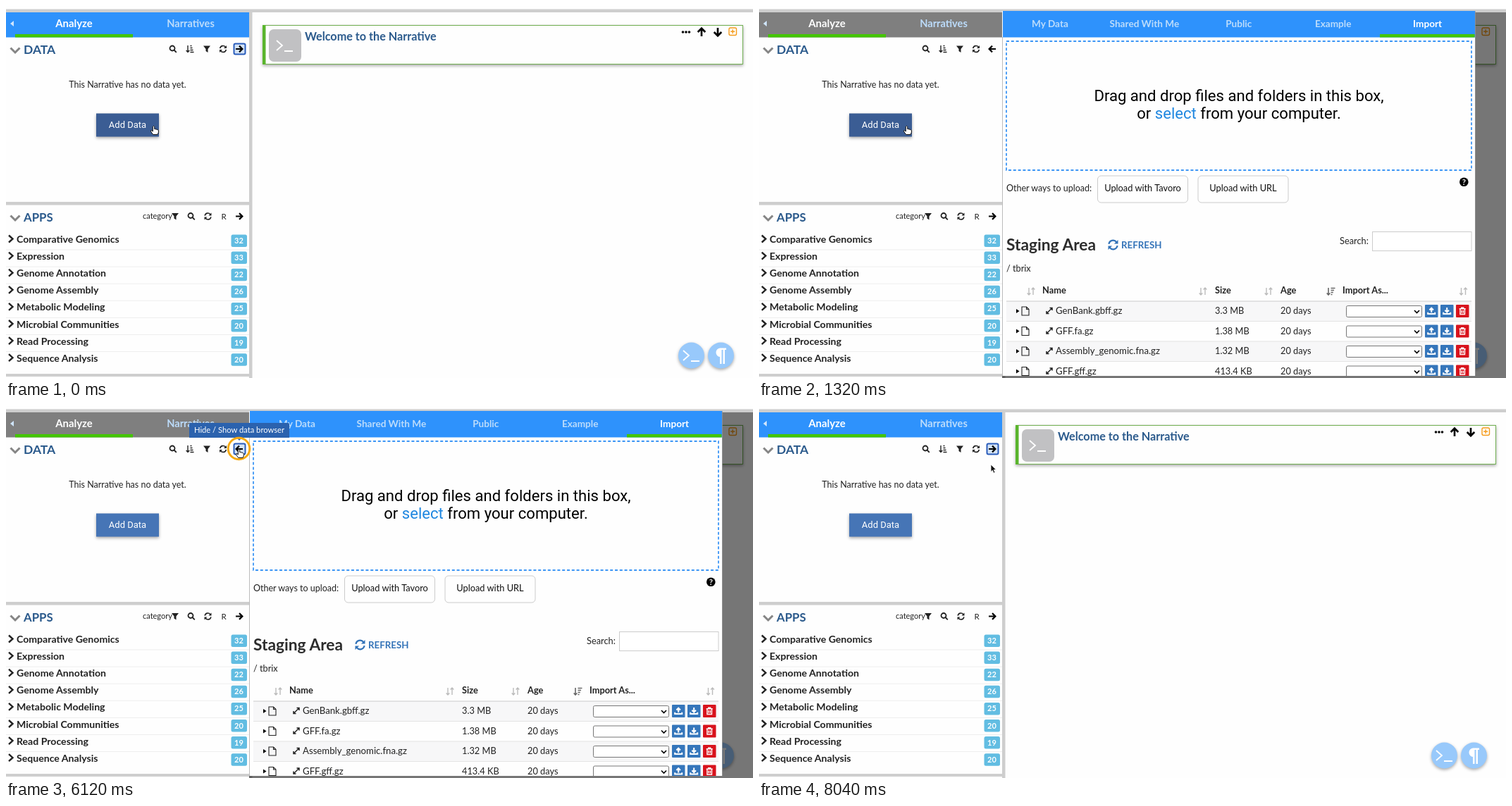
An HTML page for the animation above (8.48 s loop, 1060x528 px).

```html
<!DOCTYPE html>
<html lang="en">
<head>
<meta charset="utf-8">
<title>Adding data to a narrative</title>
<style>
html, body { margin: 0; width: 100%; height: 100%; overflow: hidden; background: #fefefe; }
svg { display: block; width: 1060px; height: 528px; font-family: Lato, "Open Sans", sans-serif; }
.b { font-weight: 700; }
.m { text-anchor: middle; }
.r { font-family: Roboto, Arial, sans-serif; }
.line { fill: none; stroke: currentColor; }
.shade { filter: drop-shadow(0 2px 2px #0005); }
</style>
</head>
<body>
<svg id="stage" viewBox="0 0 1060 528" xmlns="http://www.w3.org/2000/svg">
<defs>
  <clipPath id="side"><rect x="345" y="7" width="715" height="518"/></clipPath>
  <g id="search" class="line" stroke-width="1.8"><circle cx="-1" cy="-1" r="3.5"/><path d="M1.5 1.5L4.8 4.8"/></g>
  <path id="filter" d="M-5-4.5H5L1.5 0V5L-1.5 3V0Z" fill="currentColor"/>
  <g id="refresh"><path class="line" stroke-width="1.6" d="M-4.3-.8A4.3 4.3 0 0 1 3.4-2.8M4.3.8A4.3 4.3 0 0 1-3.4 2.8"/>
    <path fill="currentColor" d="M5-5V-1H1ZM-5 5V1H-1Z"/></g>
  <path id="arrow" class="line" stroke-width="2.2" d="M-5 0H4M0-4.4L4.4 0L0 4.4"/>
  <path id="ascend" class="line" stroke-width="1.4" d="M-3-5V4.5M-5.3 2L-3 4.5L-.7 2M.5-4.5H2.5M.5-1.5H3.5M.5 1.5H4.5M.5 4.5H5.5"/>
  <path id="descend" class="line" stroke-width="1.6" d="M-3-5V5M-5.3 2.5L-3 5L-.7 2.5M.5-4.5H6.5M.5-1.5H5M.5 1.5H3.8M.5 4.5H2.5"/>
  <path id="updown" class="line" stroke-width="1.4" d="M-3-5V5M-5.3 2.5L-3 5L-.7 2.5M3 5V-5M.7-2.5L3-5L5.3-2.5"/>
  <path id="down" class="line" stroke-width="3" d="M-6.5-3.5L0 3L6.5-3.5"/>
  <path id="next" class="line" stroke-width="2.4" d="M-3-5L2.5 0L-3 5"/>
  <path id="file" class="line" stroke-width="1.1" d="M-5-6H1.5L5-2.5V6H-5ZM1.5-6V-2.5H5"/>
  <path id="expand" class="line" stroke-width="1.5" d="M-4 4L4-4M.5-4H4V-.5M-4 .5V4H-.5"/>
  <path id="upload" class="line" stroke-width="2" d="M0 2V-4M-2.8-1.5L0-4.3L2.8-1.5M-5 1.8V4H5V1.8"/>
  <path id="download" class="line" stroke-width="2" d="M0-5V1M-2.8-1.2L0 1.5L2.8-1.2M-5 1.8V4H5V1.8"/>
  <path id="trash" class="line" stroke-width="1.4" d="M-4.5-3.2H4.5M-1.5-3.2V-4.8H1.5V-3.2M-3.3-3V4.5H3.3V-3M-1.2-1V2.8M1.2-1V2.8"/>
  <path id="prompt" class="line" stroke-width="1.8" d="M-11-7L-3 0L-11 7M0 8H12"/>
</defs>
</svg>
<script>
const LOOP = 8480, STEP = 40, SLIDE = 400, WIDTH = 670;
const OPEN = 460, CLOSE = 6174;
const INK = '#222', NAVY = '#2b5a8c', BLUE = '#2e92fc', PALE = '#bcdcfb', LINK = '#3373b8', GREEN = '#43c502';

const text = (x, y, s, size, fill = INK, cls = '') =>
  `<text x="${x}" y="${y}" font-size="${size}" fill="${fill}" class="${cls}">${s}</text>`;
const rect = (x, y, w, h, fill, more = '') =>
  `<rect x="${x}" y="${y}" width="${w}" height="${h}" fill="${fill}" ${more}/>`;
const icon = (id, x, y, color = INK, extra = '') =>
  `<use href="#${id}" transform="translate(${x} ${y}) ${extra}" color="${color}"/>`;
const outline = (color, rx = 0) => `stroke="${color}" rx="${rx}"`;

function mainArea() {
  const bubble = x => `<circle cx="${x}" cy="496" r="18.5" fill="#98c9fb" class="shade"/>`;
  return rect(364, 27, 682, 56, '#fefefe', 'class="shade"')
    + rect(364.5, 27.5, 681, 55, 'none', outline('#70ae50'))
    + rect(364, 27, 4.5, 56, '#5ab52d')
    + rect(373, 33, 46, 46, '#c1c1c3', 'rx="7"')
    + icon('prompt', 395, 56, '#fff')
    + text(424, 49, 'Welcome to the Narrative', 16.2, NAVY, 'b')
    + [960.5, 965, 969.5].map(x => `<circle cx="${x}" cy="37" r="1.8"/>`).join('')
    + icon('arrow', 987, 37, '#000', 'rotate(-90) scale(1.2)')
    + icon('arrow', 1010, 37, '#000', 'rotate(90) scale(1.2)')
    + rect(1026, 31, 10.5, 10.5, 'none', outline('#f59b1a', 2) + ' stroke-width="1.4"')
    + '<path d="M1028.2 36.2H1034.2M1031.2 33.2V39.2" stroke="#f59b1a" stroke-width="1.4"/>'
    + bubble(972.5) + icon('prompt', 972, 496, '#fff')
    + bubble(1014.5)
    + '<path d="M1013 498A6.3 6.3 0 0 1 1013 485.5H1022V488H1020V508H1017.5V488H1015.5V508H1013Z" fill="#fff"/>';
}

function leftPanel() {
  const apps = [['Comparative Genomics', 32], ['Expression', 33], ['Genome Annotation', 22],
    ['Genome Assembly', 26], ['Metabolic Modeling', 25], ['Microbial Communities', 20],
    ['Read Processing', 19], ['Sequence Analysis', 20]];
  const rows = apps.map(([name, count], i) => {
    const y = 331 + i * 24.1;
    return icon('next', 7, y - .5)
      + text(15, y + 5, name, 14.1, INK, 'b')
      + rect(319.5, y - 6.5, 22.5, 17.5, '#62bde2', 'rx="2.5"')
      + text(330.5, y + 6, count, 11, '#fff', 'b m')
      + (i < 7 ? rect(0, y + 14.5, 345, 1, '#eee') : '');
  }).join('');
  return rect(0, 9, 345, 519, '#fefefe')
    + rect(0, 9, 345, 35.5, BLUE, 'id="head"')
    + rect(13, 40, 167, 4.5, GREEN)
    + '<path d="M11 21V29L6 25Z" fill="#cfe5fd"/>'
    + text(96.5, 30, 'Analyze', 14.9, '#fff', 'b m')
    + text(262, 30, 'Narratives', 14.6, PALE, 'b m')
    + icon('down', 13, 63, '#858585') + text(25, 68, 'DATA', 17.5, NAVY, 'b')
    + icon('search', 237, 61) + icon('ascend', 261, 61) + icon('filter', 285, 61) + icon('refresh', 308, 61)
    + rect(323.5, 53.5, 16, 15, '#d3e2f5', outline('#2a5dbb', 2) + ' stroke-width="2" id="focus"')
    + `<g id="toggle">${icon('arrow', 0, 0, '#000')}</g>`
    + text(172.5, 116, 'This Narrative has no data yet.', 12.5, INK, 'm')
    + rect(128, 152.5, 89, 33, '#3b5d94', 'id="add" class="shade"')
    + text(172.5, 173, 'Add Data', 13, '#fff', 'r m')
    + rect(0, 278, 345, 4.5, '#cecece')
    + icon('down', 13, 301, '#858585') + text(25, 305.5, 'APPS', 16.8, NAVY, 'b')
    + text(194, 302, 'category', 11) + icon('filter', 240, 298.5)
    + icon('search', 263, 298.5) + icon('refresh', 286.5, 298.5)
    + text(309, 302.5, 'R', 11.5, INK, 'm') + icon('arrow', 331, 298.5, '#000')
    + rows + rect(0, 522, 345, 4, '#cecece');
}

function browser() {
  const tabs = ['My Data', 'Shared With Me', 'Public', 'Example', 'Import'].map((s, i) =>
    text(413 + i * 133.9, 30, s, 13.6, i < 4 ? PALE : '#fff', 'b m')).join('');
  const button = (x, s) => rect(x + .5, 241, 128, 38, '#fefefe', outline('#ccc', 5))
    + text(x + 64.5, 263, s, 12.8, '#111', 'm');
  const heads = [['Name', 402], ['Size', 647], ['Age', 740], ['Import As...', 828]]
    .map(([s, x]) => text(x, 407.5, s, 12.8, INK, 'b')).join('');
  const files = [['GenBank.gbff.gz', '3.3 MB'], ['GFF.fa.gz', '1.38 MB'],
    ['Assembly_genomic.fna.gz', '1.32 MB'], ['GFF.gff.gz', '413.4 KB']];
  const rows = files.map(([name, size], i) => {
    const y = 433 + i * 28.5;
    const action = (id, x, fill) => rect(x, y - 9, 18.5, 18, fill, 'rx="1"') + icon(id, x + 9.2, y, '#fff');
    return rect(351, y - 14, 660, 28.5, i % 2 ? '#fefefe' : '#f7f7f8')
      + rect(351, y - 14.5, 660, 1, i ? '#e4e4e4' : '#ccc')
      + `<path d="M365 ${y - 3}L369.5 ${y}L365 ${y + 3}Z"/>`
      + icon('file', 378, y) + icon('expand', 412, y - .5)
      + text(421, y + 4, name, 13.2) + text(647, y + 4, size, 12.8) + text(740, y + 4, '20 days', 12.8)
      + rect(833.5, y - 7.5, 107, 16, '#fff', outline('#777', 2))
      + `<path class="line" stroke-width="1.6" d="M930 ${y - 1}L933.5 ${y + 2.5}L937 ${y - 1}"/>`
      + action('upload', 945, '#3576bb') + action('download', 967, '#3576bb') + action('trash', 989, '#d8131d');
  }).join('');
  return rect(345, 7, WIDTH + 1, 521, '#fefefe')
    + rect(345, 44, 1, 484, '#bbb') + rect(1016, 7, .7, 521, '#999')
    + rect(346, 7, WIDTH, 37.5, BLUE) + tabs + rect(881, 40, 134.5, 4.5, GREEN)
    + rect(351, 50, 660, 183, 'none', 'stroke="#3d96f5" stroke-width="1.8" stroke-dasharray="4 2.8"')
    + text(681, 134.5, 'Drag and drop files and folders in this box,', 22.1, '#000', 'r m')
    + text(681, 160.3, 'or <tspan fill="#1f87e0">select</tspan> from your computer.', 22.1, '#000', 'r m')
    + text(351, 263, 'Other ways to upload:', 12.5)
    + button(480, 'Upload with Tavoro') + button(622.5, 'Upload with URL')
    + '<circle cx="1000.3" cy="249.7" r="6.3"/>' + text(1000.3, 253.7, '?', 11.5, '#fff', 'b m')
    + text(351, 347, 'Staging Area', 22.75, '#2d2d2d', 'b')
    + icon('refresh', 502.5, 339, LINK, 'scale(1.4)') + text(514, 344, 'REFRESH', 13.3, LINK, 'b')
    + text(351, 377, '/ tbrix', 12.7)
    + text(824, 338, 'Search:', 12.8) + rect(870.5, 320.5, 140.5, 27, '#fff', outline('#ccc'))
    + heads + [386, 630, 723, 999.5].map(x => icon('updown', x, 405, '#bbb')).join('')
    + icon('descend', 811, 405, '#666') + rows;
}

const stage = document.getElementById('stage');
stage.insertAdjacentHTML('beforeend',
  rect(0, 0, 1060, 528, '#fefefe')
  + rect(0, 4.5, 1060, 4.5, '#cecece') + rect(345, 9, 4.5, 519, '#cecece')
  + mainArea()
  + rect(345, 9, 715, 519, '#0008', 'id="veil"')
  + leftPanel()
  + `<g clip-path="url(#side)"><g id="panel">${browser()}</g></g>`
  + '<g id="tip"><path d="M260 26Q260 24 262 24H400Q402 24 402 26V45H335L331 49L327 45H260Z" fill="#2b62ae"/>'
  + text(331, 38.3, 'Hide / Show data browser', 11.2, '#fff', 'm') + '</g>'
  + '<circle id="ring" fill="none" stroke="#f5a912" stroke-width="3"/>'
  + '<path id="hand" fill="#fff" stroke="#111" stroke-linejoin="round" d="M-1.2 1.2Q0-.6 1.2 1.2V4.5L3 4.8L4.6 5.2L6 5.8L7 6.8V9L5.5 12.5H-.8L-4 8Q-4.2 6-2.8 6.6L-1.2 8Z"/>'
  + '<path id="pointer" fill="#111" stroke="#fff" stroke-width=".8" d="M0 0V10.5L2.4 8.3L4 12.2L6 11.4L4.3 7.6H7.5Z"/>');

const parts = Object.fromEntries(['head', 'focus', 'toggle', 'add', 'veil', 'panel', 'tip', 'ring', 'hand', 'pointer']
  .map(id => [id, document.getElementById(id)]));
const set = (id, attrs) => { for (const k in attrs) parts[id].setAttribute(k, attrs[k]); };
const show = (id, on) => set(id, { visibility: on ? 'visible' : 'hidden' });
const ramp = (t, from, length) => Math.min(1, Math.max(0, (t - from) / length));
const swing = p => .5 - Math.cos(Math.PI * p) / 2;

function drawCursor(t) {
  const over = swing(ramp(t, 3920, 920)), away = swing(ramp(t, 7640, 400));
  const x = 209.5 + 121 * over - 1.5 * away, y = 170 - 109 * over + 22 * away;
  const onButton = x < 217 && y > 152;
  const onToggle = t >= 4920 && y < 70;
  const at = { transform: `translate(${x} ${y})` };
  set('hand', at);
  set('pointer', at);
  show('hand', onButton || onToggle);
  show('pointer', !onButton && !onToggle);
  set('add', { fill: onButton ? '#3b5d94' : '#4675b6' });
}

function drawRing(t) {
  const closing = t >= 5840;
  const p = (t - (closing ? 5840 : 320)) / 1000;
  const on = p >= 0 && p < 1;
  show('ring', on);
  if (on) set('ring', {
    cx: closing ? 330.5 : 209, cy: closing ? 60.5 : 170,
    r: 7.7 + 29 * p - 7 * p * p,
    opacity: Math.min(1, (1 - p) / .4)
  });
}

function draw(now) {
  const t = Math.floor(now % LOOP / STEP) * STEP;
  const active = t >= OPEN && t < CLOSE;
  const shown = swing(ramp(t, OPEN, SLIDE)) - swing(ramp(t, CLOSE, SLIDE));
  set('panel', { transform: `translate(${(shown - 1) * WIDTH} 0)` });
  show('panel', shown > 0);
  show('veil', active);
  set('head', { fill: active ? '#7f7f7f' : BLUE });
  set('toggle', { transform: `translate(331 61) scale(${active ? -1 : 1} 1)` });
  show('focus', t < 320 || t >= 5840);
  set('tip', { opacity: ramp(t, 5480, 160) - ramp(t, 6200, 160) });
  drawRing(t);
  drawCursor(t);
  requestAnimationFrame(draw);
}
draw(performance.now());
</script>
</body>
</html>
```
